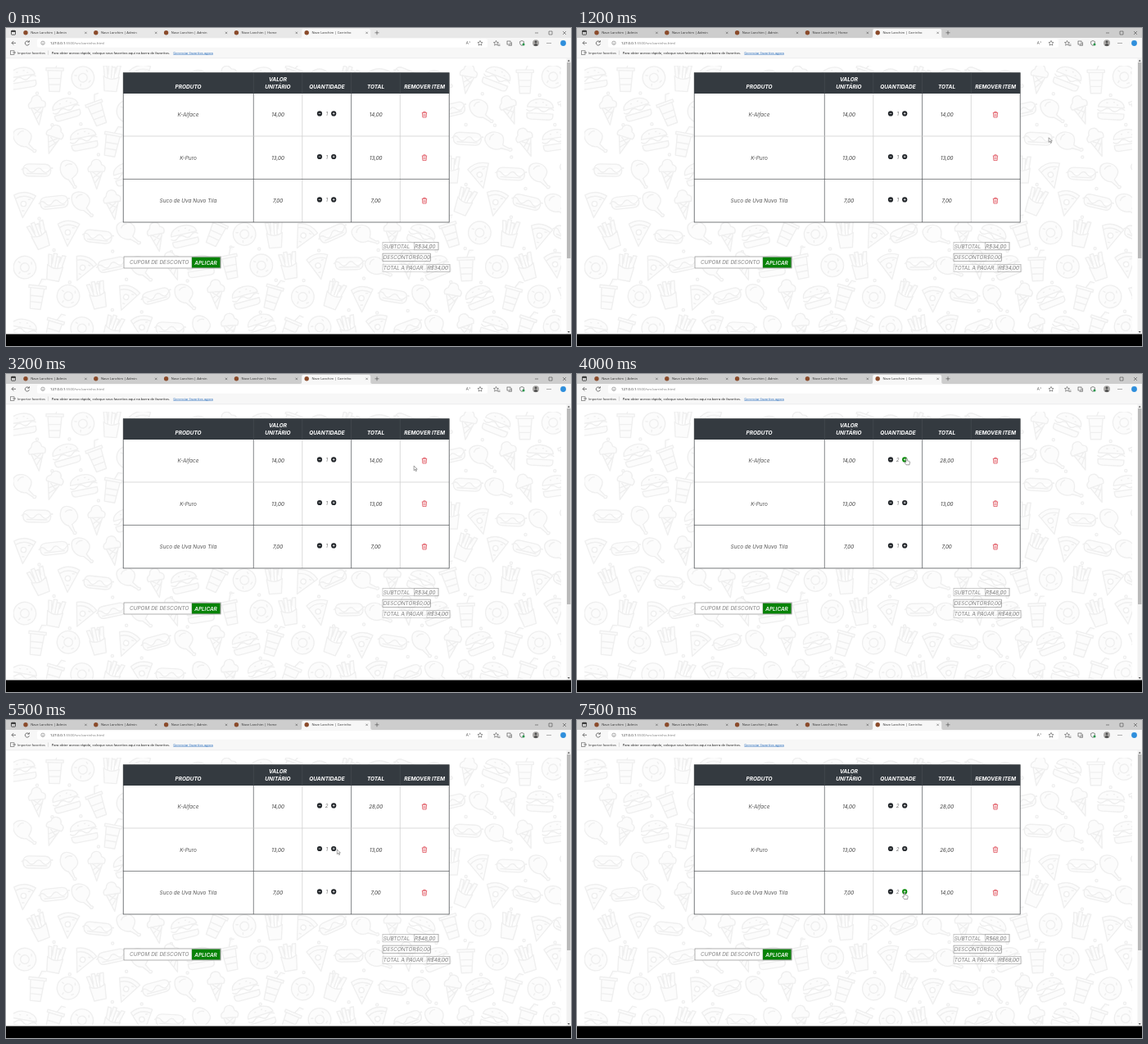
An HTML page that plays this animation: 690 px wide and 388 px high, repeating every 8000 ms.

```html
<!DOCTYPE html>
<html lang="pt-BR">
<head>
<meta charset="utf-8">
<title>Carrinho</title>
<style>
html, body { margin: 0; width: 100%; height: 100%; overflow: hidden; background: #fff; }
svg { display: block; width: 690px; height: 388px; }
text { white-space: pre; }
.ui { font-family: "Open Sans", "Noto Sans", sans-serif; }
.page { font-family: Inter, "Open Sans", sans-serif; font-style: italic; }
</style>
</head>
<body>
<svg id="stage" viewBox="0 0 690 388" xmlns="http://www.w3.org/2000/svg"></svg>
<script>
const LOOP = 8000, TICK = 100, FOCUS = 700;
const stage = document.getElementById('stage');

const rect = (x, y, w, h, fill, more = '') =>
  `<rect x="${x}" y="${y}" width="${w}" height="${h}" fill="${fill}" ${more}/>`;
const line = (x1, y1, x2, y2, color, w = 1) =>
  `<path d="M${x1} ${y1}L${x2} ${y2}" stroke="${color}" stroke-width="${w}"/>`;
const path = (d, color, w = 0.7, more = '') =>
  `<path d="${d}" fill="none" stroke="${color}" stroke-width="${w}" ${more}/>`;
const dot = (x, y, r, fill, more = '') =>
  `<circle cx="${x}" cy="${y}" r="${r}" fill="${fill}" ${more}/>`;
const text = (x, y, s, size, fill, more = '') =>
  `<text x="${x}" y="${y}" font-size="${size}" fill="${fill}" ${more}>${s}</text>`;
const mid = (x, y, s, size, fill, more = '') =>
  text(x, y, s, size, fill, 'text-anchor="middle" ' + more);

// Food doodles, each drawn around its own centre
const DOODLES = [
  'M-15-3C-14-16 14-16 15-3ZM-16 0q4 4 8 0t8 0 8 0 8 0M-15 4H15V7Q15 11 10 11H-10Q-15 11-15 7ZM-6-8h2M2-9h2M6-6h2',
  'M-9-2L-7 15H7L9-2Q0 4-9-2ZM-8-2L-10-14h4L-4 0M-4-4V-16H0V0M0-13h4L3 0M4-6L6-15h4L8-2',
  'M-12-4C-14-14 2-16 8-7C11-2 7 2 6 5L12 11q4 0 2 3q-3 1-3-1L3 8C-4 9-11 4-12-4ZM-7-5q2-5 7-5',
  'M-8-9H8L6 15H-6ZM-10-12H10V-9H-10ZM1-12L4-20h5M-7 0H7M-6.5 7H6.5',
  'M-12-10Q0-17 13-9L-2 16ZM-10-6Q0-12 11-5M-4 0a3 3 0 1 0 6 0a3 3 0 1 0-6 0M4-5h3M-3 8h3',
  'M-7-3L0 17L7-3ZM-9-3C-12-9-6-10-6-11C-5-19 5-19 6-11C8-10 12-9 9-3ZM-4 4L5-3M-2 10L6 0M4 4L-5-3',
  'M-13 0a13 13 0 1 0 26 0a13 13 0 1 0-26 0M-5 0a5 5 0 1 0 10 0a5 5 0 1 0-10 0M-9-5l3 1M6-8l1 3M8 5l-3 2M-5 9l1-3',
  'M-16 0Q-16-7-9-7H9Q16-7 16 0Q16 7 9 7H-9Q-16 7-16 0ZM-18 0q4-5 8 0t8 0 8 0 8 0 4-2M-12 4H12',
];

function wallpaper() {
  let seed = 11, out = '';
  const rnd = () => (seed = seed * 16807 % 2147483647) / 2147483647;
  for (let row = 0; row < 9; row++) {
    for (let col = 0; col < 19; col++) {
      const x = 22 + col * 36 + (row % 2) * 17 + rnd() * 4 - 2;
      const y = 62 + row * 38 + rnd() * 6 - 3;
      const turn = rnd() * 50 - 25;
      const kind = (col * 3 + row * 5) % DOODLES.length;
      out += `<path d="${DOODLES[kind]}" transform="translate(${x.toFixed(1)} ${y.toFixed(1)}) rotate(${turn.toFixed(0)}) scale(1.06)"/>`;
      if (rnd() < 0.6) out += `<circle cx="${(x + 18).toFixed(1)}" cy="${(y + 18).toFixed(1)}" r="1.6"/>`;
    }
  }
  return `<clipPath id="paper"><rect x="9" y="46" width="669" height="326"/></clipPath>
    <g clip-path="url(#paper)" fill="#fcfcfc" stroke="#efefef" stroke-width="1.3" stroke-linejoin="round">${out}</g>`;
}

function browser() {
  const ink = '#444';
  let s = rect(0, 0, 690, 12, '#e8e8e8', 'id="strip"') + rect(0, 12, 690, 25, '#f7f7f7');
  s += rect(6.5, 3.2, 5, 5, 'none', 'rx=".7" stroke="#222" stroke-width=".7"') + rect(6.5, 3.2, 5, 1.6, '#222');
  ['Admin', 'Admin', 'Admin', 'Home', 'Carrinho'].forEach((name, i) => {
    const x = 18 + i * 85.8;
    if (i === 4) s += `<path d="M${x - 2} 12Q${x} 12 ${x} 10V3Q${x} 1 ${x + 2} 1H${x + 82}Q${x + 84} 1 ${x + 84} 3V10Q${x + 84} 12 ${x + 86} 12Z" fill="#f7f7f7"/>`;
    s += dot(x + 6, 5.8, 2.7, '#8a4b2b');
    s += text(x + 12.2, 7.3, 'Nave Lanchim | ' + name, 4.1, '#333');
    s += path(`M${x + 78.2} 4.7l2.4 2.4m0-2.4l-2.4 2.4`, ink, 0.5);
  });
  s += path('M450.5 5.8h5M453 3.3v5', ink, 0.6);
  s += path('M646 6h4M663 4h4v4h-4ZM680 4l4 4m0-4l-4 4', '#333', 0.5);

  s += rect(38, 13.3, 550, 10.4, '#fff', 'rx="2"');
  s += path('M12 18.3H7m2.3-2.3L7 18.3l2.3 2.3', ink, 0.7);
  s += path('M28 17a2.6 2.6 0 1 0 .4 2.2M28.4 15.2v2h-2', ink, 0.7);
  s += dot(45, 18.3, 2.2, 'none', 'stroke="#555" stroke-width=".5"') + line(45, 17.8, 45, 19.6, '#555', 0.5);
  s += text(54, 19.9, '127.0.0.1<tspan fill="#777">:5500/src/carrinho.html</tspan>', 4.35, '#222');
  s += text(561.8, 20, 'A', 4.8, '#555') + path('M566 16.2q1 1 0 2', '#555', 0.5);
  const star = x => path(`M${x} 15.4l.9 2 2.1.2-1.6 1.5.5 2.1-1.9-1.1-1.9 1.1.5-2.1-1.6-1.5 2.1-.2Z`, ink, 0.55);
  s += star(579) + star(598.5) + path('M601 20h2.5M601 21.5h2.5', ink, 0.5);
  s += rect(612, 16, 4, 4, 'none', 'stroke="#444" stroke-width=".6"') + path('M613.5 21.3h4v-4', ink, 0.6);
  s += path('M630 15.5l2.4 1v2q0 2-2.4 3-2.4-1-2.4-3v-2Z', '#444', 0.6) + dot(632, 20, 1.5, '#26944a');
  s += dot(647, 18.3, 4, '#aaa8a6') + dot(647, 17, 1.4, '#50504f') + '<path d="M644.3 21q2.7-3.8 5.4 0q-2.7 2-5.4 0" fill="#50504f"/>';
  [661, 663, 665].forEach(x => { s += dot(x, 18.5, 0.5, '#333'); });
  s += dot(680.5, 18.5, 3.4, '#2f8fdc');

  s += rect(5.5, 27.8, 4.5, 4.5, 'none', 'stroke="#555" stroke-width=".6"') + path('M8 30h3.5m-1-1l1 1-1 1', '#555', 0.5);
  s += text(13.8, 31.6, 'Importar favoritos', 4, '#333') + line(51.5, 27.5, 51.5, 32.8, '#c4c4c4', 0.5);
  s += text(55.7, 31.6, 'Para obter acesso rápido, coloque seus favoritos aqui na barra de favoritos.', 4.12, '#111');
  s += text(204.3, 31.6, 'Gerenciar favoritos agora', 4.12, '#1a63b8', 'text-decoration="underline"');
  s += line(0, 36.8, 690, 36.8, '#dfe1e3', 0.5);

  s += rect(684.5, 37, 5.5, 337, '#f1f1f1') + rect(685, 42, 4.4, 239, '#b9b9b9');
  s += '<path d="M685.7 40.7h3l-1.5-2ZM685.7 370h3l-1.5 2Z" fill="#555"/>';
  s += rect(0, 373.5, 690, 14.5, '#000');
  return `<g class="ui">${s}</g>`;
}

const ROWS = [
  { name: 'K-Alface', price: 14, y: 104.4, bought: 4000 },
  { name: 'K-Puro', price: 13, y: 157, bought: 5900 },
  { name: 'Suco de Uva Nuvo Tila', price: 7, y: 209.4, bought: 7500 },
];
const MINUS_X = 383, PLUS_X = 400.2, TRASH_X = 511;
const money = n => n + ',00';

function trash(x, y) {
  return path(`M${x - 3.2} ${y - 2.2}h6.4M${x - 1.2} ${y - 2.3}v-1.1h2.4v1.1M${x - 2.5} ${y - 2}l.4 5.4h4.2l.4-5.4M${x - 0.9} ${y - 0.7}v2.8M${x + 0.9} ${y - 0.7}v2.8`, '#dc4550', 0.75);
}

function fixedPage() {
  const dark = '#505356', pale = '#cacaca', head = 'font-weight="700"';
  let s = rect(143, 54.5, 398.3, 182.5, '#fff') + rect(143, 54.5, 398.3, 25.5, '#343a40');
  [302.3, 361.8, 421.6, 481.3].forEach((x, i) => {
    s += line(x, 55, x, 80, '#4b5157', 0.6) + line(x, 80, x, 237, i % 2 ? pale : dark, 0.7);
  });
  s += line(143, 132, 541.3, 132, pale, 0.7) + line(143, 184.4, 541.3, 184.4, dark, 0.7);
  s += rect(143.2, 54.7, 398, 182.3, 'none', 'stroke="#484c4f" stroke-width=".75"');
  [[222.5, 74, 'PRODUTO'], [332, 64.8, 'VALOR'], [332, 74, 'UNITÁRIO'], [392, 74, 'QUANTIDADE'],
   [451.5, 74, 'TOTAL'], [511.2, 74, 'REMOVER ITEM']]
    .forEach(([x, y, t]) => { s += mid(x, y, t, 6.5, '#fff', head); });
  ROWS.forEach(r => {
    s += mid(222.5, r.y + 3.6, r.name, 6.45, '#555');
    s += mid(332, r.y + 3.6, money(r.price), 6.2, '#3a3a3a');
    s += dot(MINUS_X, r.y, 3.1, '#212529') + line(MINUS_X - 1.4, r.y, MINUS_X + 1.4, r.y, '#fff', 0.7);
    s += trash(TRASH_X, r.y + 1.2);
  });
  s += rect(144, 279, 118.2, 14, '#fff', 'stroke="#8f8f8f" stroke-width=".7"');
  s += text(151, 288.4, 'CUPOM DE DESCONTO', 6.45, '#808080');
  s += rect(227, 279.8, 34.6, 12.6, '#078307', 'stroke="#4d744d" stroke-width=".5"');
  s += mid(244, 288.5, 'APLICAR', 6.4, '#fff', 'font-weight="600"');
  return s;
}

function liveRow(r, t, hot) {
  const n = t >= r.bought ? 2 : 1;
  return mid(391.7, r.y + 2.6, n, 6.2, '#777') +
    dot(PLUS_X, r.y, 3.1, hot ? '#0a8a0a' : '#212529') +
    path(`M${PLUS_X - 1.4} ${r.y}h2.8M${PLUS_X} ${r.y - 1.4}v2.8`, '#fff', 0.7) +
    mid(451.7, r.y + 3.6, money(r.price * n), 6.2, '#3a3a3a');
}

function totals(sum) {
  const frame = (x, y, w, c) => rect(x, y, w, 9.2, 'none', `stroke="${c}" stroke-width=".6"`);
  const put = (x, y, s, more = '') => text(x, y, s, 6.4, '#5c5c5c', 'font-weight="300" ' + more);
  const right = (x, y, s) => put(x, y, s, 'text-anchor="end"');
  const shift = sum === 61 ? 1 : 0, value = 'R$' + money(sum);
  return frame(460, 261.6, 68, '#aaa') + frame(498.4 + shift, 261.6, 29.6 - shift, '#aaa') +
    put(460.8, 268.5, 'SUBTOTAL') + right(524.4, 268.5, value) +
    frame(460, 275.1, 58.4, '#808080') + put(460.8, 282, 'DESCONTO') + right(518, 282, 'R$0,00') +
    frame(460, 288.5, 82, '#c4c4c4') + frame(514 + shift, 288.5, 28 - shift, '#b4b4b4') +
    put(460.8, 295.4, 'TOTAL A PAGAR') + right(540, 295.4, value);
}

// Pointer route: time, x, y
const ROUTE = [
  [700, 694, 150], [1100, 588, 138], [1500, 512, 111], [1800, 510.8, 108.6], [3100, 510.8, 108.6],
  [3400, 462, 122], [3700, 402.4, 102.8], [4800, 402.4, 102.8], [5500, 404.3, 158], [5700, 401.5, 158],
  [5900, 401.5, 158], [6300, 397, 204], [6700, 399.5, 211.4], [6800, 399.5, 211.4], [6900, 400, 210.6],
];

function pointer(t) {
  const i = ROUTE.findIndex(k => k[0] > t);
  if (i === 0) return ROUTE[0].slice(1);
  if (i < 0) return ROUTE[ROUTE.length - 1].slice(1);
  const [t0, x0, y0] = ROUTE[i - 1], [t1, x1, y1] = ROUTE[i];
  const u = (t - t0) / (t1 - t0), e = u * u * (3 - 2 * u);
  return [x0 + (x1 - x0) * e, y0 + (y1 - y0) * e];
}

function cursor(x, y, hand) {
  const d = hand
    ? 'M-.7.5Q0-.5.7.5V3l2.6.6q1 .3.8 1.4L3.6 8H-.4L-2.5 5.1q0-1.2 1.8-.2Z'
    : 'M0 0V5.6L1.4 4.4 2.4 6.6 3.3 6.2 2.3 4.1H4.1Z';
  return `<path d="${d}" transform="translate(${x.toFixed(2)} ${y.toFixed(2)})" fill="#fff" stroke="#444" stroke-width=".5" stroke-linejoin="round"/>`;
}

stage.innerHTML = rect(0, 0, 690, 388, '#fff') + wallpaper() +
  `<g class="page">${fixedPage()}</g><g class="page" id="live"></g>` + browser() + '<g id="mouse"></g>';
const [live, mouse, strip] = ['live', 'mouse', 'strip'].map(id => document.getElementById(id));

function draw(t) {
  const [x, y] = pointer(t);
  const near = (cx, cy) => Math.hypot(x - cx, y - cy) < 3.8;
  const sum = ROWS.reduce((a, r) => a + r.price * (t >= r.bought ? 2 : 1), 0);
  const hand = ROWS.some(r => near(PLUS_X, r.y) || near(TRASH_X, r.y + 1.2));
  // The title strip darkens once the window gets the focus
  strip.setAttribute('fill', t < FOCUS ? '#e8e8e8' : '#cdcdcd');
  live.innerHTML = ROWS.map(r => liveRow(r, t, near(PLUS_X, r.y))).join('') + totals(sum);
  mouse.innerHTML = cursor(x, y, hand);
}

let last = -1;
function tick() {
  const t = Math.floor(performance.now() % LOOP / TICK) * TICK;
  if (t !== last) draw(last = t);
  requestAnimationFrame(tick);
}
tick();
</script>
</body>
</html>
```
